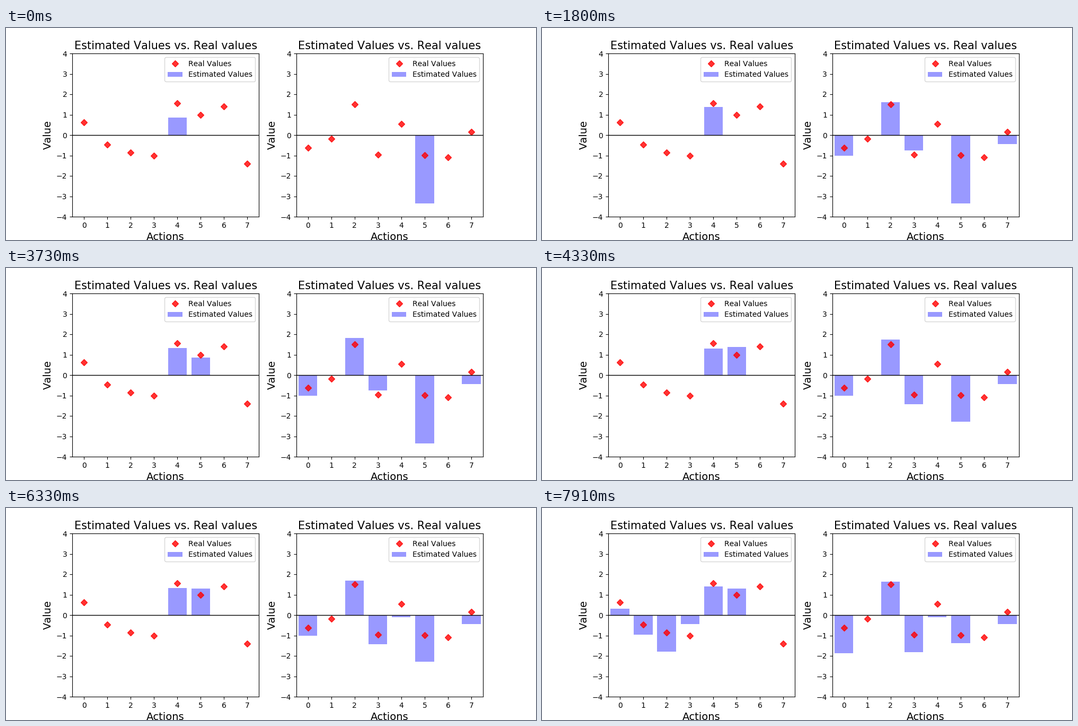
Recreate the animation shown at these times as a matplotlib script. Size 1000x400 px, loop 8 s.

```python
import numpy as np
import matplotlib.pyplot as plt
from matplotlib.animation import FuncAnimation

LOOP_MS, TICK_MS = 8000, 50
# Whole-pixel kerning gives slightly wider text
plt.rcParams.update({"font.family": "DejaVu Sans", "text.kerning_factor": 6})


def pulls(start, gap, *results):
    """Evenly spaced exploratory pulls: (step, action, new estimate)."""
    return [(start + gap * i, *r) for i, r in enumerate(results)]


class Panel:
    def __init__(self, ax, real, explored, greedy, path):
        self.explored, self.greedy, self.path = explored, greedy, path
        actions = np.arange(len(real))
        ax.plot(actions, real, "rD", alpha=0.8, label="Real Values")
        self.bars = ax.bar(actions, np.zeros(len(real)), color="b", alpha=0.4,
                           label="Estimated Values")
        ax.axhline(0, color="black", lw=1)
        ax.set(xlim=(-0.5, 7.5), ylim=(-4, 4), xticks=actions)
        ax.set_title("Estimated Values vs. Real values", fontsize=15)
        ax.set_xlabel("Actions", fontsize=14)
        ax.set_ylabel("Value", fontsize=14)
        ax.legend(loc="upper right")

    def show(self, step):
        heights = np.zeros(len(self.bars))
        for start, action, value in self.explored:
            if step >= start:
                heights[action] = value
        # The favourite's running mean drifts between a few key points
        heights[self.greedy] = np.interp(step, *zip(*self.path), left=0)
        for bar, height in zip(self.bars, heights):
            bar.set_height(height)


fig, (left, right) = plt.subplots(1, 2, figsize=(10, 4), dpi=100)
panels = [
    Panel(left, [0.62, -0.46, -0.85, -1.01, 1.56, 0.99, 1.41, -1.40],
          pulls(28, 12, (5, 0.87), (5, 1.38)) + pulls(50, 1, (5, 1.30))
          + pulls(67, 4, (1, -0.95), (2, -1.79), (3, -0.43), (0, 0.31)),
          greedy=4,
          path=[(0, 0.87), (5, 1.80), (18, 1.38), (28, 1.38), (50, 1.28), (81, 1.40)]),
    Panel(right, [-0.62, -0.18, 1.51, -0.96, 0.55, -0.99, -1.09, 0.16],
          pulls(0, 1, (5, -3.35), (0, -1.0), (7, -0.43), (3, -0.75))
          + pulls(39, 3, (5, -2.28), (3, -1.42))
          + pulls(57, 4, (4, -0.41), (4, -0.10))
          + pulls(74, 3, (3, -1.81), (0, -1.86), (5, -1.37)),
          greedy=2,
          path=[(4, 2.39), (5, 2.15), (18, 1.61), (35, 1.85), (44, 1.74), (81, 1.64)]),
]

# Steps come every 100 ms, with one short step and a quicker finish
n = np.arange(82)
STEPS = 100 * n - 70 * (n >= 32) - 15 * np.maximum(n - 73, 0)


def update(i):
    step = np.searchsorted(STEPS, i * TICK_MS + 30, side="right") - 1
    for panel in panels:
        panel.show(step)
    return [bar for panel in panels for bar in panel.bars]


anim = FuncAnimation(fig, update, frames=LOOP_MS // TICK_MS, interval=TICK_MS,
                     repeat=True, repeat_delay=0, blit=False)
plt.show()
```
